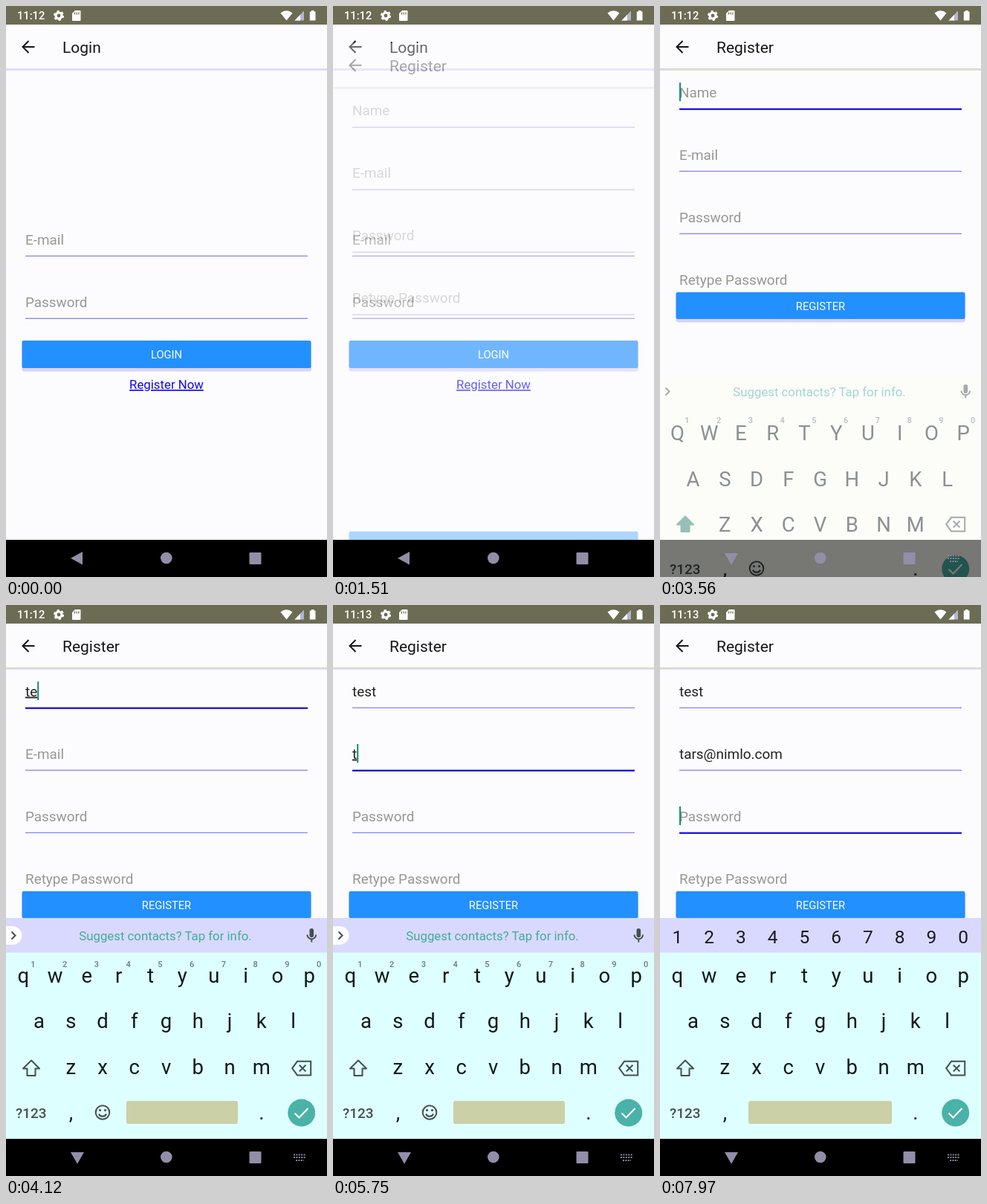
Animation, 432 px wide and 768 px high, one loop 8 s. Source, as an HTML page:

```html
<!DOCTYPE html>
<html lang="en">
<head>
<meta charset="utf-8">
<title>Register form</title>
<style>
  html, body { margin: 0; width: 100%; height: 100%; overflow: hidden; background: #000; }
  svg { display: block; width: 100vw; height: 100vh; font-family: Roboto, sans-serif; }
  text { white-space: pre; }
  .title { font-size: 21px; fill: #161616; }
  .hint, .value { font-size: 18.9px; }
  .hint { fill: #979793; }
  .value { fill: #222; }
  .label { font-size: 14.7px; fill: #fff; text-anchor: middle; }
  .link { font-size: 16.8px; fill: #1208f0; text-anchor: middle; text-decoration: underline; }
  .key { font-size: 27.5px; fill: #0d1a1a; text-anchor: middle; }
  .digit { font-size: 24.5px; fill: #1a1a22; text-anchor: middle; }
  .sup { font-size: 11px; font-weight: 500; fill: #6d7878; text-anchor: middle; }
  .line { fill: none; stroke: #454f4f; stroke-width: 2; }
</style>
</head>
<body>
<svg id="stage" viewBox="0 0 432 768" preserveAspectRatio="none">
  <defs><clipPath id="body"><rect y="25" width="432" height="693"/></clipPath></defs>
  <rect width="432" height="768" fill="#fcfcff"/>
  <g clip-path="url(#body)">
    <g id="login"></g>
    <g id="register"></g>
  </g>

  <rect y="718" width="432" height="50" fill="#000"/>

  <g id="board">
    <rect id="back" y="421" width="432" height="297"/>
    <g id="deco">
      <rect y="421" width="432" height="46.5" fill="#d9d9ff"/>
      <path id="chip" d="M0 432H9a12 12 0 0 1 0 25H0z" fill="#fdfdff"/>
      <rect id="space" y="667" height="31" rx="3" fill="#cbd0a6"/>
    </g>
    <g id="bar">
      <path class="line" d="M7.500 439.500l5 5-5 5"/>
      <text id="tip" x="214.500" y="451" font-size="16.8" fill="#40ad98" text-anchor="middle">Suggest contacts? Tap for info.</text>
      <rect x="408.500" y="435" width="5.600" height="12" rx="2.800" fill="#454f4f"/>
      <path class="line" stroke-width="1.600" d="M405.500 443.500a5.800 5.800 0 0 0 11.600 0M411.300 449.500v4"/>
    </g>
    <g id="digits"></g>
    <g id="sups"></g>
    <g id="lower"></g>
    <g id="upper"></g>
    <path id="shift" d="M34 612.500l11 11h-5.500v9.500h-11v-9.500h-5.500z" stroke-linejoin="round" stroke-width="2"/>
    <path class="line" d="M392 613.800h18.200v18.600H392l-6.800-9.300zM394.800 618.800l8.600 8.600M403.400 618.800l-8.600 8.600"/>
    <text x="13" y="689.500" font-size="18.900" font-weight="500" fill="#454f4f">?123</text>
    <text x="87.500" y="692" class="key" font-size="24">,</text>
    <text x="344" y="692" class="key" font-size="24">.</text>
    <g id="smile">
      <circle class="line" cx="130" cy="682.500" r="9.300"/>
      <circle cx="126.500" cy="679.500" r="1.600" fill="#454f4f"/>
      <circle cx="133.500" cy="679.500" r="1.600" fill="#454f4f"/>
      <path class="line" d="M125 684.500a5.400 5.400 0 0 0 10 0"/>
    </g>
    <circle cx="397.700" cy="683" r="18.500" fill="#4ab2a8"/>
    <path d="M388.500 683.500l6 6 12-12.500" fill="none" stroke="#fff" stroke-width="2.200"/>
  </g>

  <g id="nav" fill="#928ea8">
    <path id="left" d="M87 742.700l16-8.700v17.400z"/>
    <path id="down" d="M87 736h18l-9 15.700z"/>
    <circle cx="215.800" cy="742.500" r="7.800"/>
    <rect x="327.500" y="735" width="16" height="16" rx="1"/>
    <path id="keys" d="M387 739.500h17M387 743h17M390 747h11" fill="none" stroke="#8c889c" stroke-width="2" stroke-dasharray="2 1.400"/>
  </g>

  <g id="status" fill="#fff">
    <rect width="432" height="25" fill="#6c6c54"/>
    <text id="clock" x="15" y="18.300" font-size="14.700" font-weight="500"></text>
    <circle cx="71" cy="13" r="4" fill="none" stroke="#fff" stroke-width="3.200"/>
    <circle cx="71" cy="13" r="6" fill="none" stroke="#fff" stroke-width="2.200" stroke-dasharray="3.140 3.140"/>
    <path d="M93 6h6.500q1 0 1 1v12q0 1-1 1h-9.500q-1 0-1-1v-9z"/>
    <path d="M92.500 8.500v3M95.200 8.500v3M97.900 8.500v3" stroke="#6c6c54" stroke-width="1.200"/>
    <path d="M369.500 9.500q8-6.500 16 0l-8 10z"/>
    <path d="M388.500 19.500l12.500-13v13z" fill="#b4b4d2"/>
    <path d="M388.500 19.500l7.500-7.800v7.800z"/>
    <path d="M411 6h3.500v1.500h2v12h-7.700v-12h2.200z"/>
  </g>
</svg>
<script>
const NS = 'http://www.w3.org/2000/svg';
const $ = id => document.getElementById(id);

function add(parent, tag, attrs, text) {
  const el = document.createElementNS(NS, tag);
  for (const k in attrs) el.setAttribute(k, attrs[k]);
  if (text) el.textContent = text;
  parent.appendChild(el);
  return el;
}
const set = (el, k, v) => { if (el.getAttribute(k) !== String(v)) el.setAttribute(k, v); };
const show = (el, on) => set(el, 'visibility', on ? 'visible' : 'hidden');
const write = (el, s) => { if (el.textContent !== s) el.textContent = s; };

function header(page, title, rule) {
  add(page, 'rect', { y: 25, width: 432, height: 693, fill: '#fcfcff' });
  add(page, 'rect', { y: 84, width: 432, height: 1.4, fill: rule });
  add(page, 'rect', { y: 85.4, width: 432, height: 1.4, fill: '#d9d5fb' });
  add(page, 'path', { d: 'M38.500 55H23M30.500 47l-8 8 8 8', fill: 'none', stroke: '#161616', 'stroke-width': 2 });
  add(page, 'text', { x: 76, y: 63, class: 'title' }, title);
}

function field(page, y, name) {
  return {
    y,
    hint: add(page, 'text', { x: 26, y: y + 6.5, class: 'hint' }, name),
    value: add(page, 'text', { x: 26, y: y + 6.5, class: 'value' }),
    rule: add(page, 'rect', { x: 26, y: y + 21.6, width: 380, height: 1.4, fill: '#918bf2' })
  };
}

function button(page, y, h, label) {
  const g = add(page, 'g', {});
  add(g, 'rect', { x: 21.5, y: y + 2, width: 389.5, height: h + 2.5, rx: 3, fill: '#d8d2f8' });
  add(g, 'rect', { x: 21.5, y, width: 389, height: h, rx: 2, fill: '#2290ff' });
  add(g, 'text', { x: 216, y: y + 24, class: 'label' }, label);
  return g;
}

const login = $('login'), register = $('register');
header(login, 'Login', '#d9d5fb');
field(login, 314, 'E-mail');
field(login, 398, 'Password');
button(login, 450, 37, 'LOGIN');
add(login, 'text', { x: 216, y: 515, class: 'link' }, 'Register Now');

header(register, 'Register', '#d6d6a6');
const fields = ['Name', 'E-mail', 'Password', 'Retype Password']
  .map((name, i) => field(register, 116 + 84 * i, name));
const submit = button(register, 385, 36, 'REGISTER');
const caret = add(register, 'rect', { width: 2, height: 25, fill: '#129070' });

const STEP = 42.75;
[['qwertyuiop', 23.4, 507.5], ['asdfghjkl', 44.6, 569], ['zxcvbnm', 87.3, 630.5]].forEach(([row, x, y]) => {
  [...row].forEach((c, i) => {
    add($('lower'), 'text', { x: x + STEP * i, y, class: 'key' }, c);
    add($('upper'), 'text', { x: x + STEP * i, y: y + 2.5, class: 'key' }, c.toUpperCase());
  });
});
[...'1234567890'].forEach((c, i) => {
  add($('digits'), 'text', { x: 23.4 + STEP * i, y: 454.7, class: 'digit' }, c);
  add($('sups'), 'text', { x: 36.3 + STEP * i, y: 486.5, class: 'sup' }, c);
});

// Timeline in ms
const LOOP = 8000;
const OPEN = 1453, OPEN_LEN = 350;
const BOARD = 3540, RISE = 3690, MINUTE = 4140;
const FOCUS = [3340, 5300, 7820];
const TYPING = [
  { text: 'test', start: 4000, gap: 120 },
  { text: 'tars@nimlo.com', start: 5700, gap: 150 }
];

function lerp(x, xs, ys) {
  let i = 1;
  while (i < xs.length - 1 && x > xs[i]) i++;
  const k = Math.min(1, Math.max(0, (x - xs[i - 1]) / (xs[i] - xs[i - 1])));
  return ys[i - 1] + (ys[i] - ys[i - 1]) * k;
}

const typed = ({ text, start, gap }, t) =>
  Math.min(text.length, Math.max(0, Math.floor((t - start) / gap) + 1));

function drawFields(t) {
  const active = FOCUS.filter(f => t >= f).length - 1;
  let edit = FOCUS[active];
  fields.forEach((f, i) => {
    const job = TYPING[i], n = job ? typed(job, t) : 0;
    const s = job ? job.text.slice(0, n) : '';
    const on = i === active;
    write(f.value, s);
    show(f.hint, !n);
    set(f.value, 'text-decoration', on && n && !s.includes('@') ? 'underline' : 'none');
    set(f.rule, 'fill', on ? '#1006dc' : '#918bf2');
    set(f.rule, 'height', on ? 2.2 : 1.4);
    if (on) {
      if (n) edit = job.start + (n - 1) * job.gap;
      set(caret, 'x', 26 + (n ? f.value.getComputedTextLength() : 0));
      set(caret, 'y', f.y - 13);
    }
  });
  show(caret, active >= 0 && (t - edit) % 1000 < 500);
}

function drawBoard(t) {
  const open = t >= BOARD;
  set($('board'), 'display', open ? 'inline' : 'none');
  show($('left'), !open);
  show($('down'), open);
  show($('keys'), open);
  set(submit, 'transform', `translate(0 ${open ? 0 : 297})`);
  if (!open) return;

  const k = Math.min(1, Math.max(0, (t - RISE) / 200));
  const alpha = lerp(t, [RISE, RISE + 130], [0.47, 1]);
  const soft = alpha < 0.8;
  set($('board'), 'transform', `translate(0 ${74 * (1 - k) ** 3})`);
  set($('board'), 'opacity', alpha);
  set($('back'), 'fill', soft ? '#fcfcf4' : '#deffff');
  set($('deco'), 'display', soft ? 'none' : 'inline');

  const caps = t < TYPING[0].start, secret = t >= FOCUS[2];
  show($('upper'), caps);
  show($('lower'), !caps);
  set($('shift'), 'fill', caps ? '#2a7c68' : 'none');
  set($('shift'), 'stroke', caps ? '#2a7c68' : '#454f4f');
  show($('digits'), secret);
  show($('sups'), !secret);
  show($('smile'), !secret);
  show($('chip'), !secret);
  set($('bar'), 'display', secret ? 'none' : 'inline');
  show($('tip'), typed(TYPING[1], t) < 5);
  set($('space'), 'x', secret ? 119 : 162);
  set($('space'), 'width', secret ? 193 : 150);
}

function draw(t) {
  const p = 1 - (1 - Math.min(1, Math.max(0, (t - OPEN) / OPEN_LEN))) ** 5;
  set(register, 'opacity', lerp(p, [0, 0.5, 0.9, 1], [0, 0.25, 0.7, 1]));
  set(register, 'transform', `translate(0 ${61.4 * (1 - p)})`);
  write($('clock'), t < MINUTE ? '11:12' : '11:13');
  drawFields(t);
  drawBoard(t);
}

const begin = performance.now();
function tick() {
  draw((performance.now() - begin) % LOOP);
  requestAnimationFrame(tick);
}
tick();
</script>
</body>
</html>
```
